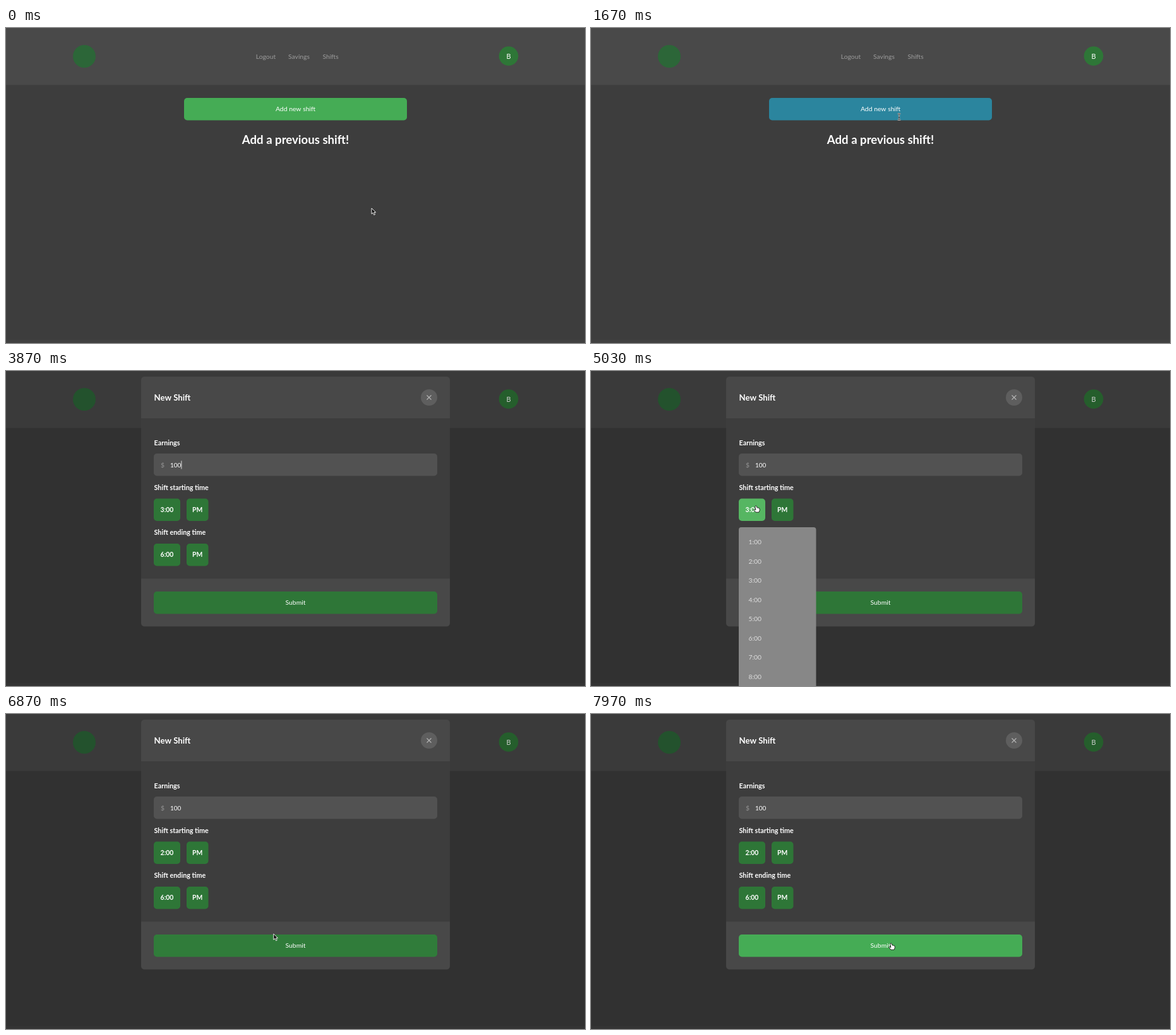
An HTML page with a canvas that plays this animation: 917 px wide and 500 px high, repeating every 8000 ms.

```html
<!DOCTYPE html>
<html lang="en">
<head>
<meta charset="utf-8">
<title>Shift tracker</title>
<style>
  html, body { margin: 0; width: 100%; height: 100%; overflow: hidden; background: #3d3d3d; }
  canvas { display: block; width: 917px; height: 500px; }
</style>
</head>
<body>
<canvas id="stage"></canvas>
<script>
const W = 917, H = 500, LOOP = 8000;
const canvas = document.getElementById('stage');
const ctx = canvas.getContext('2d');
const dpr = window.devicePixelRatio || 1;
canvas.width = W * dpr;
canvas.height = H * dpr;

const DARK = [46, 118, 55], GREEN = [69, 172, 85], LIGHT = [86, 182, 98], BLUE = [34, 120, 183];

const ramp = (t, a, b) => Math.min(1, Math.max(0, (t - a) / (b - a)));
const ease = u => u * u * (3 - 2 * u);
const lerp = (a, b, u) => a + (b - a) * u;
const mix = (a, b, u) => a.map((v, i) => lerp(v, b[i], u));
const rgb = c => `rgb(${c.map(Math.round).join()})`;

// Pointer stops: start time, arrival time, x, y
const stops = [
  [0, 0, 579, 286],
  [570, 1370, 488, 141],
  [2170, 2630, 262, 147],
  [4100, 4870, 262, 214],
  [5300, 5930, 270, 305],
  [6200, 7200, 476, 364]
];

function pointerAt(t) {
  let [, , x, y] = stops[0];
  for (const [a, b, nx, ny] of stops.slice(1)) {
    const u = ease(ramp(t, a, b));
    x = lerp(x, nx, u);
    y = lerp(y, ny, u);
  }
  return { x, y };
}

function pointerKind(t, y) {
  if (t < 1660) return y < 146 ? 'hand' : 'arrow';
  if (t >= 3300 && t < 4100) return 'none';
  if (t < 4870) return y < 167 ? 'beam' : y < 202 ? 'arrow' : 'hand';
  if (t < 6170) return y > 238 && y < 248 ? 'arrow' : 'hand';
  return y > 309.5 && y < 350 ? 'arrow' : 'hand';
}

function box(x, y, w, h, fill, r = 0) {
  ctx.fillStyle = fill;
  ctx.beginPath();
  ctx.roundRect(x, y, w, h, r);
  ctx.fill();
}

function disc(x, y, r, fill) {
  ctx.fillStyle = fill;
  ctx.beginPath();
  ctx.arc(x, y, r, 0, 7);
  ctx.fill();
}

function text(str, x, y, { size = 10.4, weight = 400, color = '#fff', align = 'left' } = {}) {
  ctx.font = `${weight} ${size}px Lato, "Open Sans", sans-serif`;
  ctx.fillStyle = color;
  ctx.textAlign = align;
  ctx.fillText(str, x, y);
}

function button(label, x, y, w, h, fill, weight = 400) {
  box(x, y, w, h, rgb(fill), 5);
  text(label, x + w / 2, y + h / 2 + 3.7, { weight, align: 'center' });
}

function line(color, width, ...segments) {
  ctx.strokeStyle = color;
  ctx.lineWidth = width;
  ctx.beginPath();
  for (const [a, b, c, d] of segments) {
    ctx.moveTo(a, b);
    ctx.lineTo(c, d);
  }
  ctx.stroke();
}

const shapes = {
  arrow: { path: new Path2D('M0 0V9.2L2.2 7.2 3.8 10.8 5.5 10 3.9 6.6H6.7Z'), fill: '#111', edge: '#fff' },
  hand: { path: new Path2D('M-1.7 .4Q-.7-.7 .1 .5L1.2 3.2Q2.2 2.4 2.7 3.4 3.8 2.9 4.1 4 5.2 3.9 5.2 5.2V7.3L4 10.2H-1L-4 6.8Q-4.4 5.6-3 5.7L-1.1 6.6-2.1 1.7Z'), fill: '#fff', edge: '#111' }
};

function drawPointer(t) {
  const { x, y } = pointerAt(t);
  const kind = pointerKind(t, y);
  if (kind === 'none') return;
  ctx.save();
  ctx.translate(x, y);
  ctx.lineJoin = 'round';
  if (kind === 'beam') {
    const bars = [[0, -4.5, 0, 4.5], [-2.2, -4.8, 2.2, -4.8], [-2.2, 4.8, 2.2, 4.8], [-1, 1.2, 1, 1.2]];
    line('#ddd', 2.2, ...bars);
    line('#222', 0.9, ...bars);
  } else {
    const { path, fill, edge } = shapes[kind];
    ctx.fillStyle = fill;
    ctx.strokeStyle = edge;
    ctx.lineWidth = 0.9;
    ctx.fill(path);
    ctx.stroke(path);
  }
  ctx.restore();
}

function drawPage(t) {
  box(0, 0, W, H, '#3d3d3d');
  box(0, 495, W, 5, '#414141');
  box(0, 0, W, 90.5, '#494949');
  disc(124, 45, 18, '#2c6638');
  const nav = { size: 10.3, color: '#9c9c9c', align: 'center' };
  text('Logout', 411.5, 48.5, nav);
  text('Savings', 464, 48.5, nav);
  text('Shifts', 514, 48.5, nav);
  disc(796, 44.5, 15.3, rgb(DARK));
  text('B', 796, 48.5, { size: 11, align: 'center' });
  button('Add new shift', 282, 111, 353, 35.5, mix(GREEN, BLUE, ease(ramp(t, 1550, 1730))));
  text('Add a previous shift!', 458.5, 184, { size: 18.6, weight: 700, align: 'center' });
}

function submitColor(t) {
  const hover = mix(DARK, GREEN, ramp(t, 6850, 7050));
  return mix(hover, BLUE, ease(ramp(t, 7460, 7660)) - ease(ramp(t, 7740, 7960)));
}

function drawModal(t) {
  const bold = { size: 10.8, weight: 700 };
  box(214, 9, 489, 396.5, '#484848', 5);
  box(214, 75, 489, 254.5, '#3d3d3d');
  text('New Shift', 234.5, 46.5, { size: 13.2, weight: 700 });
  disc(670, 42, 13, '#5e5e5e');
  line('#b4b4b4', 1.2, [666.5, 38.5, 673.5, 45.5], [673.5, 38.5, 666.5, 45.5]);

  text('Earnings', 234.5, 117.5, bold);
  box(234, 131, 449, 35.5, '#525252', 5);
  text('$', 245, 152.8, { color: '#949494' });
  const typed = '100'.slice(0, [3330, 3570, 3800].filter(s => t >= s).length);
  text(typed, 260, 152.8, { size: 10 });
  const caretOn = t >= 3100 && t < 4930 && !(t >= 4370 && t < 4870);
  if (caretOn) {
    const cx = 260.5 + ctx.measureText(typed).width;
    line('#fff', 0.8, [cx, 142.5, cx, 155.5]);
  }

  text('Shift starting time', 234.5, 188.5, bold);
  const startHover = ramp(t, 4650, 4800) - ramp(t, 5510, 5690);
  button(t < 6110 ? '3:00' : '2:00', 234, 202.5, 42, 35.5, mix(DARK, LIGHT, startHover), 700);
  button('PM', 286, 202.5, 34.5, 35.5, DARK, 700);

  text('Shift ending time', 234.5, 259.8, bold);
  const endHover = ramp(t, 6180, 6330) - ramp(t, 6360, 6540);
  button('6:00', 234, 274, 42, 35.5, mix(DARK, LIGHT, endHover), 700);
  button('PM', 286, 274, 34.5, 35.5, DARK, 700);

  button('Submit', 234, 350, 449, 35.5, submitColor(t));
}

function drawMenu() {
  box(234, 248, 122.5, 270, '#878787', 4);
  for (let i = 0; i < 8; i++) {
    text(`${i + 1}:00`, 249.5, 275.1 + i * 30.52, { size: 10.3, color: '#dedede' });
  }
}

function render(t) {
  ctx.setTransform(dpr, 0, 0, dpr, 0, 0);
  ctx.globalAlpha = 1;
  drawPage(t);
  const modal = ramp(t, 1675, 1770);
  if (modal > 0) {
    ctx.globalAlpha = modal;
    box(0, 0, W, H, 'rgba(0,0,0,.2)');
    drawModal(t);
  }
  const menu = ease(ramp(t, 4930, 5030)) - ramp(t, 6100, 6165);
  if (menu > 0) {
    ctx.globalAlpha = menu;
    drawMenu();
  }
  ctx.globalAlpha = 1;
  drawPointer(t);
}

const start = performance.now();
function tick() {
  render((performance.now() - start) % LOOP);
  requestAnimationFrame(tick);
}
tick();
</script>
</body>
</html>
```
